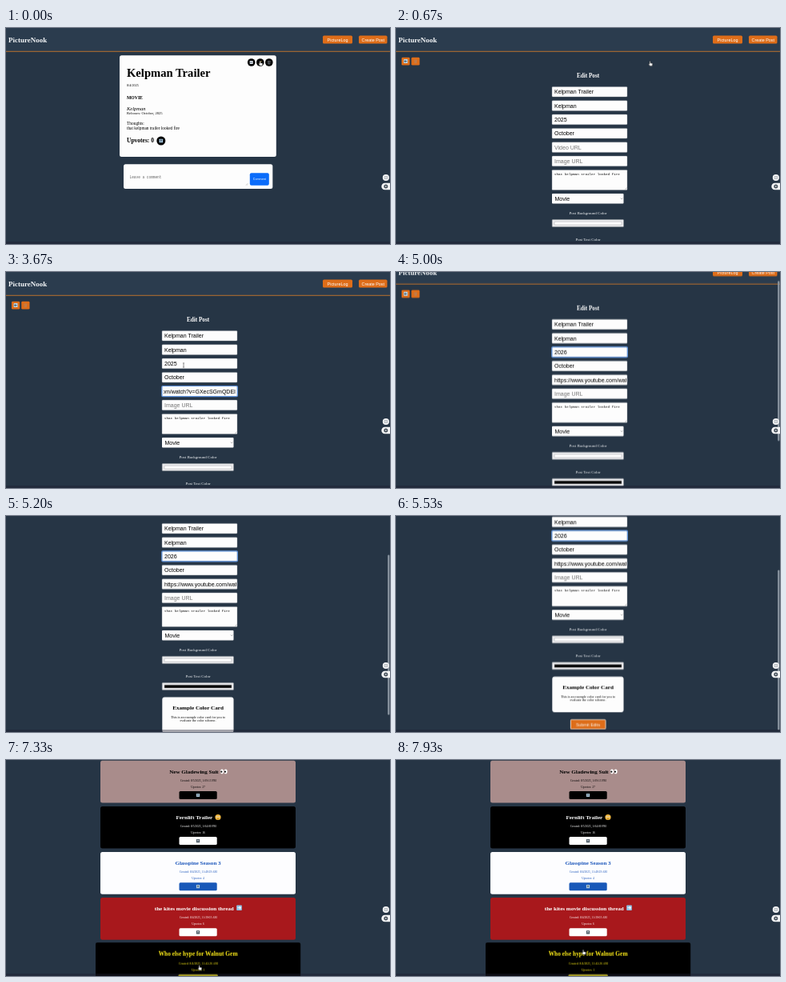
An HTML page for the animation above (8 s loop, 480 by 270 pixels).

```html
<!DOCTYPE html>
<html lang="en">
<head>
<meta charset="utf-8">
<title>PictureNook</title>
<style>
html, body { margin: 0; width: 100%; height: 100%; overflow: hidden; background: #263545; }
svg { display: block; width: 100%; height: 100%; }
text { font-family: "Liberation Serif", "Times New Roman", serif; white-space: pre; }
.b { font-weight: bold; }
.i { font-style: italic; }
.s { font-family: "Liberation Sans", Arial, sans-serif; }
.m { font-family: "Liberation Mono", monospace; }
.c { text-anchor: middle; }
.e { text-anchor: end; }

/* hard switches */
.sw { opacity: 0; animation: 8s step-end infinite; }
.post { animation-name: post; }
.edit { animation-name: edit; }
.feed { animation-name: feed; }
.hint { animation-name: hint; }
.urlEnd { animation-name: urlEnd; }
.urlStart { animation-name: urlStart; }
.ringUrl { animation-name: ringUrl; }
.ringYear { animation-name: ringYear; }
.y5 { animation-name: y5; }
.y20 { animation-name: y20; }
.y6 { animation-name: y6; }
.bar { animation-name: bar; }
.arrow { animation-name: arrow; }
.beam { animation-name: beam; }
.hand { animation-name: hand; }
@keyframes post { 0% { opacity: 1 } 3.3%, 100% { opacity: 0 } }
@keyframes edit { 0% { opacity: 0 } 3.3% { opacity: 1 } 86.6%, 100% { opacity: 0 } }
@keyframes feed { 0% { opacity: 0 } 86.6%, 100% { opacity: 1 } }
@keyframes hint { 0% { opacity: 1 } 33.3%, 100% { opacity: 0 } }
@keyframes urlEnd { 0% { opacity: 0 } 33.3% { opacity: 1 } 47.5%, 100% { opacity: 0 } }
@keyframes urlStart { 0% { opacity: 0 } 47.5%, 100% { opacity: 1 } }
@keyframes ringUrl { 0% { opacity: 0 } 26.5% { opacity: 1 } 47.5%, 100% { opacity: 0 } }
@keyframes ringYear { 0% { opacity: 0 } 47.5%, 100% { opacity: 1 } }
@keyframes y5 { 0% { opacity: 1 } 52%, 100% { opacity: 0 } }
@keyframes y20 { 0% { opacity: 0 } 52% { opacity: 1 } 55.8%, 100% { opacity: 0 } }
@keyframes y6 { 0% { opacity: 0 } 55.8%, 100% { opacity: 1 } }
@keyframes bar { 0% { opacity: 0 } 61.8% { opacity: 1 } 75%, 100% { opacity: 0 } }
@keyframes arrow { 0% { opacity: 0 } 9% { opacity: 1 } 26% { opacity: 0 } 73.3% { opacity: 1 } 82% { opacity: 0 } 100% { opacity: 0 } }
@keyframes beam { 0% { opacity: 0 } 26% { opacity: 1 } 33.3% { opacity: 0 } 38.3% { opacity: 1 } 52% { opacity: 0 } 100% { opacity: 0 } }
@keyframes hand { 0% { opacity: 1 } 9% { opacity: 0 } 82% { opacity: 1 } 100% { opacity: 1 } }

/* movement */
.scroll { animation: scroll 8s linear infinite; }
.thumb { animation: thumb 8s linear infinite; }
.cursor { animation: cursor 8s ease-in-out infinite; }
.press, .hover { transform-box: fill-box; transform-origin: center; }
.press { animation: press 8s linear infinite; }
.hover { animation: hover 8s ease-out infinite; }
@keyframes scroll {
  0%, 61.8% { transform: translateY(0) }
  65% { transform: translateY(-64px); animation-timing-function: ease-out }
  70%, 100% { transform: translateY(-91px) }
}
@keyframes thumb {
  0%, 61.8% { transform: translateY(0) }
  65% { transform: translateY(48px); animation-timing-function: ease-out }
  70%, 100% { transform: translateY(68px) }
}
@keyframes cursor {
  0%, 8.2% { transform: translate(317px, 41px) }
  15% { transform: translate(229px, 190px) }
  18.4% { transform: translate(234px, 164px) }
  20.9% { transform: translate(238px, 151px) }
  24.1% { transform: translate(239.5px, 157px) }
  26.6%, 38.2% { transform: translate(239px, 149px) }
  45.8%, 73.3% { transform: translate(222px, 116.5px) }
  79.1% { transform: translate(245px, 237px) }
  83.3%, 96.8% { transform: translate(241px, 256.5px) }
  99.1%, 100% { transform: translate(233.5px, 237px) }
}
@keyframes press { 0%, 83.6% { transform: none } 84%, 100% { transform: scale(1.05) } }
@keyframes hover { 0%, 86.6% { transform: none } 89.5%, 100% { transform: scale(1.05) } }
</style>
</head>
<body>
<svg id="stage" viewBox="0 0 480 270" preserveAspectRatio="none"></svg>
<script>
const ORANGE = '#de6d19';
const box = (x, y, w, h, fill, r = 0, more = '') =>
  `<rect x="${x}" y="${y}" width="${w}" height="${h}" rx="${r}" fill="${fill}" ${more}/>`;
const text = (x, y, size, str, cls = '', fill = '#000') =>
  `<text x="${x}" y="${y}" font-size="${size}" class="${cls}" fill="${fill}">${str}</text>`;
const dot = (x, y, r, fill) => `<circle cx="${x}" cy="${y}" r="${r}" fill="${fill}"/>`;
const line = (d, stroke, w = 0.6) => `<path d="${d}" fill="none" stroke="${stroke}" stroke-width="${w}"/>`;
const group = (cls, body) => `<g class="${cls}">${body}</g>`;
const sw = (name, body) => group('sw ' + name, body);

// small square icon with an arrow: angle 0 points up
const tile = (x, y, s, fill, ink, angle = 0) =>
  `<g transform="translate(${x} ${y}) rotate(${angle}) scale(${s})">` +
  box(-0.5, -0.5, 1, 1, fill, 0.12) + line('M0 .32V-.28M-.24 -.04L0 -.3L.24 -.04', ink, 0.16) + '</g>';
const bin = (x, y, ink) =>
  line(`M${x - 1.8} ${y - 1.6}h3.6M${x - 1.3} ${y - 1.4}l.3 3.5h2l.3 -3.5M${x} ${y - 0.8}v2.2`, ink, 0.6);

const header = box(0, 0, 480, 29, '#2b3c4e') + box(0, 28.8, 480, 1, '#b9702f') +
  text(3, 18, 9, 'PictureNook', 'b', '#f4f6f8') +
  box(396, 9.6, 37, 10, ORANGE, 1.6) + text(414.5, 16.5, 5.4, 'PictureLog', 's c', '#fff') +
  box(441, 9.6, 35.5, 10, ORANGE, 1.6) + text(458.8, 16.5, 5.4, 'Create Post', 's c', '#fff');

const post = box(142, 34.3, 195.8, 126.8, '#fdfdfd', 2.5) +
  [306.7, 317.8, 328.8].map(x => dot(x, 43, 4.8, '#000')).join('') +
  tile(306.7, 43, 4, '#e8eef4', '#345', -90) + line('M316 45l3.4 -3.8', '#e7c66a', 1) + bin(328.8, 43, '#8b9299') +
  text(151, 61.3, 14.6, 'Kelpman Trailer', 'b') +
  text(151, 73.4, 4.2, '8/4/2025') +
  text(151, 89.4, 5.7, 'MOVIE', 'b') +
  text(151, 103.3, 6.5, 'Kelpman', 'i') +
  text(151, 108, 4.6, 'Releases: October, 2025') +
  text(151, 121.4, 5.4, 'Thoughts:') +
  text(151, 127.2, 5.3, 'that kelpman trailer looked fire') +
  text(151, 143.2, 7.5, 'Upvotes: 0', 'b') +
  dot(193.8, 141, 5.5, '#000') + tile(193.8, 141, 4.6, '#a9cbe4', '#26323d') +
  box(147, 170.2, 186.3, 30.8, '#fdfdfd', 2.5) +
  text(154.5, 188, 4.45, 'Leave a comment', 'm', '#666') +
  line('M300 196.5l2.2 -2.2M301.4 196.5l.8 -.8', '#777', 0.4) +
  box(304.8, 181.2, 24, 15.5, '#0a6cfa', 2) + text(316.8, 190.2, 3.7, 'Comment', 's c', '#fff');

const rowY = n => 73.4 + n * 17.33;
const field = (n, body) => box(195, rowY(n), 94, 12.7, '#fdfdfd', 1, 'stroke="#8a9199" stroke-width=".4"') + body;
const value = (n, str, fill) => text(198, rowY(n) + 8.9, 7, str, 's', fill);
const ring = n => box(194.8, rowY(n) - 0.2, 94.6, 13.1, 'none', 1.2, 'stroke="#5e93dd" stroke-width="1.2"');
const swatch = (y, fill) => box(195.2, y, 89.3, 9, '#ececee', 0.8, 'stroke="#8d9298" stroke-width=".5"') +
  box(198, y + 2.6, 84, 3.9, fill, 0.4, 'stroke="#a5a5a8" stroke-width=".5"');

const edit = box(7, 36.8, 10.2, 9.8, ORANGE, 1.4) + tile(12.1, 41.6, 5, '#b9d4e6', '#2d4454', -90) +
  box(19.3, 36.8, 10.2, 9.8, ORANGE, 1.4) + bin(24.4, 41.6, '#a88a72') +
  text(240, 62.4, 7.2, 'Edit Post', 'b c', '#fff') +
  field(0, value(0, 'Kelpman Trailer')) +
  field(1, value(1, 'Kelpman')) +
  field(2, sw('y5', value(2, '2025')) + sw('y20', value(2, '202')) + sw('y6', value(2, '2026')) + sw('ringYear', ring(2))) +
  field(3, value(3, 'October')) +
  field(4, sw('hint', value(4, 'Video URL', '#757575')) +
    '<g clip-path="url(#inner)">' +
    sw('urlEnd', text(287, rowY(4) + 8.9, 7, 'https://www.youtube.com/watch?v=GXecSGmQDEI', 's e')) +
    sw('urlStart', value(4, 'https://www.youtube.com/watch?v=GXecSGmQDEI')) + '</g>' +
    sw('ringUrl', ring(4))) +
  field(5, value(5, 'Image URL', '#757575')) +
  box(195, 177.5, 94, 25, '#fdfdfd', 0.8, 'stroke="#8a9199" stroke-width=".4"') +
  text(198, 184, 4.27, 'that kelpman trailer looked fire', 'm') +
  line('M286.4 201.6l2 -2M287.6 201.6l.8 -.8', '#777', 0.4) +
  box(195, 207, 89.5, 12.6, '#fdfdfd', 1) + text(198.5, 215.8, 7, 'Movie', 's') +
  line('M280.9 212.6l1.2 1.2l1.2 -1.2', '#555', 0.5) +
  text(240, 233.4, 5, 'Post Background Color', 'c', '#f3f5f7') + swatch(239.6, '#fff') +
  text(240, 266.4, 5, 'Post Text Color', 'c', '#f3f5f7') + swatch(272.6, '#000') +
  box(195.3, 290.6, 89.2, 44.4, '#fdfdfd', 3) +
  text(240, 306.2, 7.15, 'Example Color Card', 'b c') +
  text(240, 316.7, 4.25, 'This is an example color card for you to', 'c') +
  text(240, 321.3, 4.25, 'evaluate the color scheme.', 'c') +
  group('press', box(218.3, 344.2, 43.6, 12, ORANGE, 1, 'stroke="#f5e3d4" stroke-width=".9"') +
    text(240, 352.1, 5.4, 'Submit Edits', 's c', '#fff'));

const eyes = [270, 274.6].map(x =>
  `<ellipse cx="${x}" cy="14.4" rx="2" ry="2.8" fill="#fff"/>` + dot(x - 0.7, 14.7, 1.1, '#111')).join('');
const face = dot(265, 71.5, 3.6, '#f0b63c') + dot(263.6, 70.8, 0.9, '#fff') + dot(266.4, 70.8, 0.9, '#fff') +
  dot(263.6, 70.8, 0.4, '#222') + dot(266.4, 70.8, 0.4, '#222') + line('M264 73.6h2', '#7a4a12', 0.5);

// [title, centre, background, ink, button, created, votes, emoji]
const cards = [
  ['New Gladewing Suit', 235, '#a98c8b', '#000', '#000', '8/5/2025, 1:09:13 PM', 27, eyes],
  ['Fernlift Trailer', 235.3, '#000', '#fff', '#fff', '8/5/2025, 1:04:00 PM', 16, face],
  ['Glasspine Season 3', 240, '#fdfdff', '#1c56bb', '#1858b8', '8/4/2025, 11:49:29 AM', 4, ''],
  ['the kites movie discussion thread', 235.3, '#a8181c', '#fff', '#fff', '8/4/2025, 11:39:03 AM', 6,
    tile(291.5, 184.8, 6.6, '#8fc3e6', '#fff', 90)],
  ['Who else hype for Walnut Gem', 240, '#000', '#ffee1a', '#ffee1a', '8/4/2025, 11:42:26 AM', 1, '']
];
const feed = cards.map(([title, cx, bg, ink, btn, made, votes, emoji], n) => {
  const y = 0.8 + n * 57.1;
  const dark = btn === '#000' || btn === '#1858b8';
  return group(n === 4 ? 'hover' : '',
    box(118, y, 244, 52.7, bg, 2.5) + text(cx, y + 16.2, 7.05, title, 'b c', ink) + emoji +
    text(240.3, y + 26, 3.6, 'Created: ' + made, 'c', ink) +
    text(240, y + 33.7, 3.6, 'Upvotes: ' + votes, 'c', ink) +
    box(216.5, y + 38.2, 47.2, 10, btn, 1.5) +
    tile(240, y + 43.2, 4.2, dark ? '#b4cfe2' : '#46545f', dark ? '#2b3d4b' : '#e6eef4'));
}).join('');

const side = dot(474.9, 187, 4.1, '#f4f5f6') +
  line('M473 185.6h3.8v2.8h-3.8zM474.2 187h1.6', '#8b949c', 0.6) +
  '<path d="M480 193.7h-6.4a4.3 4.3 0 0 0 0 8.6h6.4z" fill="#f4f5f6"/>' +
  dot(474.8, 198, 2.5, '#46505a') + dot(474.8, 198, 1, '#c5cbd0');

const cursor = group('cursor',
  sw('arrow', '<path d="M0 0v5.2l1.2 -1l.9 1.9l.9 -.4l-.9 -1.9h1.6z" fill="#000" stroke="#fff" stroke-width=".35"/>') +
  sw('beam', line('M-1.1 -2.8q1.1 0 1.1 .7v4.2q0 .7 -1.1 .7M1.1 -2.8q-1.1 0 -1.1 .7M0 2.1q0 .7 1.1 .7', '#222', 0.5)) +
  sw('hand', '<path d="M0 .4q.6 -.8 1.1 0v2l2.3 .6q.6 .3 .5 1l-.5 2.2h-2.8l-1.9 -2.2q0 -.7 .8 -.4l.5 .4z" ' +
    'fill="#fff" stroke="#111" stroke-width=".45"/>'));

document.getElementById('stage').innerHTML =
  `<defs><clipPath id="inner">${box(197.6, rowY(4), 89.6, 13, '#000')}</clipPath></defs>` +
  box(0, 0, 480, 270, '#263545') +
  group('scroll', sw('post', header + post) + sw('edit', header + edit)) +
  sw('feed', feed) +
  sw('bar', group('thumb', box(477.2, 0.5, 2.2, 200, '#8e99a4', 1.1))) +
  box(0, 267, 480, 3, '#1f2030', 0, 'opacity=".4"') +
  side + cursor;
</script>
</body>
</html>
```
